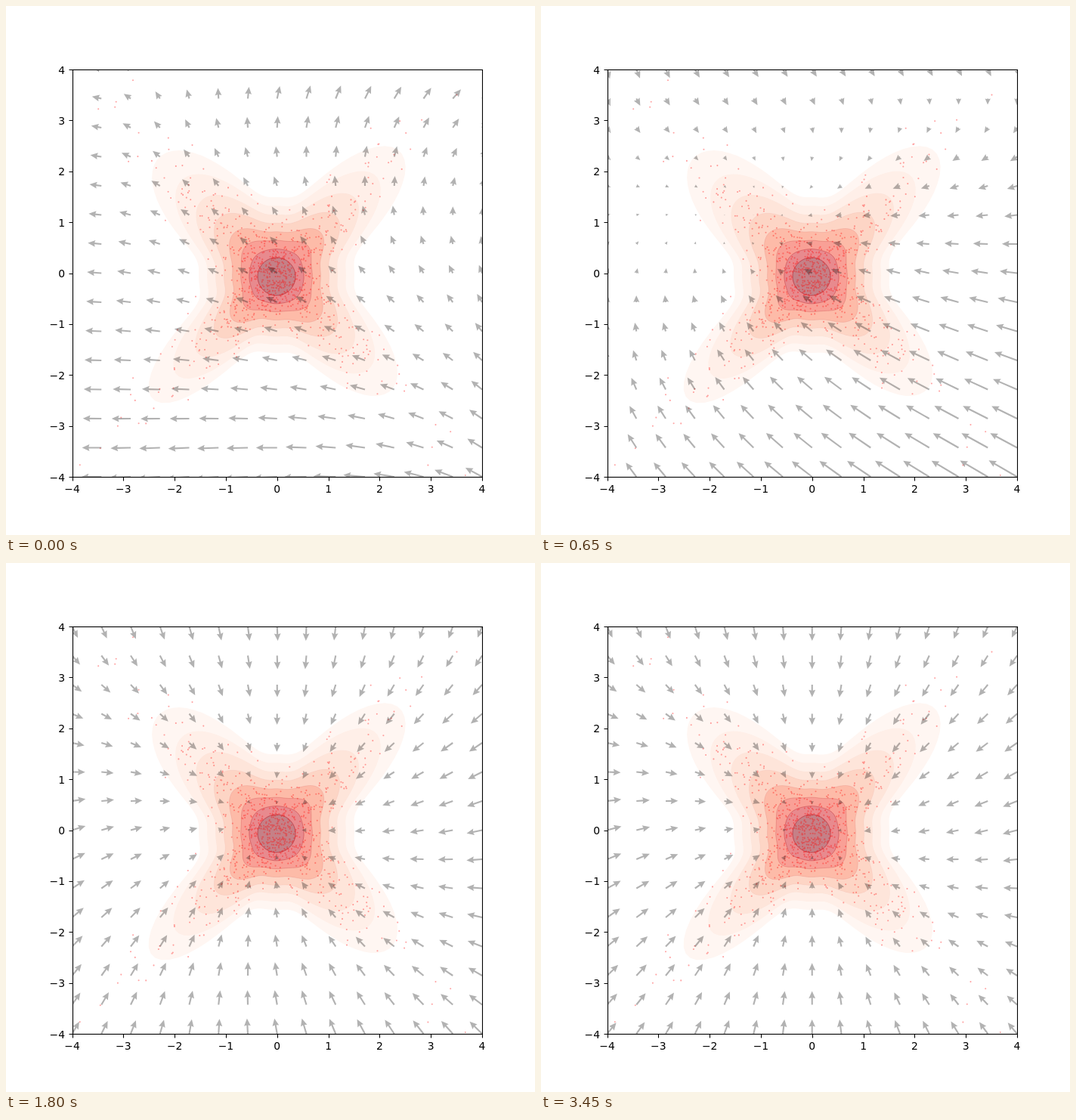
Write an HTML page that moves like this. It is 700 px wide and 700 px high and loops after 3.5 s.

```html
<!DOCTYPE html>
<html lang="en">
<head>
<meta charset="utf-8">
<title>Vector field</title>
<style>
  html, body { margin: 0; width: 100%; height: 100%; overflow: hidden; background: #fff; }
  svg { display: block; width: 100%; height: 100%; }
  text { font: 13.9px "DejaVu Sans", sans-serif; }
</style>
</head>
<body>
<svg viewBox="0 0 700 700">
  <defs><clipPath id="box"><rect x="88" y="84" width="542.5" height="539.5"/></clipPath></defs>
  <g clip-path="url(#box)">
    <g id="density" stroke="#b0101c" stroke-width="0.8"></g>
    <path id="dots" stroke="#f00" stroke-opacity="0.36" stroke-width="2.1" stroke-linecap="round"/>
    <path id="arrows" fill-opacity="0.3"/>
  </g>
  <g id="axes" stroke="#000" stroke-width="1.1" fill="none"></g>
  <g id="labels"></g>
</svg>
<script>
const LEFT = 87.5, TOP = 84, W = 542.5, H = 539, CELLS = 14;
const LOOP = 3500, STEP = 50;
const $ = id => document.getElementById(id);

function add(parent, tag, attrs, text) {
  const el = document.createElementNS(parent.namespaceURI, tag);
  for (const k in attrs) el.setAttribute(k, attrs[k]);
  if (text) el.textContent = text;
  parent.appendChild(el);
}

// Density levels: rings that stretch into four arms
const FILLS = ['#fff6f2', '#ffefe8', '#fee5da', '#fdd5c5', '#fdbba8', '#f9a096', '#e88a8e', '#c58087'];
const ARMS = [ // clockwise from lower right
  { reach: 112, power: 3.8 },
  { reach: 129, power: 6 },
  { reach: 117, power: 3.2 },
  { reach: 128, power: 4.3 }
];
FILLS.forEach((fill, i) => {
  const inner = i / 7, waist = 103 - 78 * inner, stretch = (1 - inner) ** 2;
  const pts = [];
  for (let deg = 0; deg < 360; deg += 2) {
    const a = deg * Math.PI / 180, arm = ARMS[Math.floor(deg / 90)];
    const r = waist + arm.reach * stretch * Math.abs(Math.sin(2 * a)) ** arm.power;
    pts.push(`${(358 + r * Math.cos(a)).toFixed(1)},${(356 + 2 * inner + r * Math.sin(a)).toFixed(1)}`);
  }
  add($('density'), 'polygon', { points: pts.join(' '), fill, 'stroke-opacity': 0.7 * inner ** 3 });
});

// Samples: a seeded cross-shaped cloud
let seed = 20;
const rnd = () => (seed = seed * 16807 % 2147483647) / 2147483647;
const gauss = () => Math.sqrt(-2 * Math.log(rnd())) * Math.cos(2 * Math.PI * rnd());
let dots = '';
for (let i = 0; i < 900; i++) {
  const g = gauss(), along = g * (50 + 28 * Math.abs(g)), side = gauss() * 20;
  const flip = rnd() < 0.5 ? 1 : -1;
  const x = 359 + (along + side) * 0.71, y = 356 + (along - side) * 0.71 * flip;
  dots += `M${x.toFixed(1)} ${y.toFixed(1)}h0`;
}
$('dots').setAttribute('d', dots);

// Axes
add($('axes'), 'rect', { x: 88.5, y: 84.5, width: 542, height: 539 });
for (let v = -4; v <= 4; v++) {
  const x = LEFT + (v + 4) * W / 8, y = TOP + (4 - v) * H / 8;
  const label = v < 0 ? '\u2212' + -v : '' + v;
  add($('axes'), 'path', { d: `M${Math.round(x) + 0.5} 623.5v5M88.5 ${Math.round(y) + 0.5}h-5` });
  add($('labels'), 'text', { x, y: 644, 'text-anchor': 'middle' }, label);
  add($('labels'), 'text', { x: 78, y: Math.round(y + 5.55), 'text-anchor': 'end' }, label);
}

// Field modes, in pixels with v upwards, for x and y from -1 to 1
const drift = (x, y) => [
  -12.2 + 8 * x + 18.4 * y + 6.5 * x * y - 7 * x * x * y,
  8.3 + 5.5 * x + 9.7 * y - 3 * x * x - 11 * x * x * y
];
const surge = (x, y) => [
  -7 - 2 * x + 11.5 * y + 3 * x * y,
  3.2 - 5.2 * y
];
function inward(x, y) {
  const pull = 23 / Math.sqrt(x * x + y * y + 0.47);
  return [
    -pull * x + 5 * x * y * y * (1 + 0.5 * y),
    -pull * y - 5 * x * (1 - y * y)
  ];
}

// The drift settles into the inward flow while a surge rises and fades
function fieldAt(t) {
  const settled = 1 - Math.exp(-((t / 575) ** 1.4));
  const s = t / 500, wave = (s * Math.exp(1 - s)) ** 1.3;
  return (x, y) => {
    const a = drift(x, y), b = inward(x, y), c = surge(x, y);
    return a.map((v, i) => v + (b[i] - v) * settled + c[i] * wave);
  };
}

const SHAFT = 1.08, HEAD = 9.8, NOTCH = 8.8, HALF = 4.4;
function arrow(x, y, dx, dy) {
  const len = Math.hypot(dx, dy);
  if (len < 0.3) return '';
  const k = Math.min(1, len / HEAD), c = dx / len, s = dy / len; // short arrows shrink whole
  const neck = len - NOTCH * k, barb = len - HEAD * k, w = SHAFT * k, h = HALF * k;
  const pts = [[0, w], [neck, w], [barb, h], [len, 0], [barb, -h], [neck, -w], [0, -w]];
  return 'M' + pts.map(([a, b]) =>
    `${(x + a * c - b * s).toFixed(2)} ${(y + a * s + b * c).toFixed(2)}`).join('L') + 'Z';
}

function draw(t) {
  const field = fieldAt(t);
  let d = '';
  for (let r = 0; r <= CELLS; r++) {
    for (let c = 0; c <= CELLS; c++) {
      const fx = c / CELLS, fy = r / CELLS;
      const [u, v] = field(2 * fx - 1, 1 - 2 * fy);
      d += arrow(LEFT + fx * W, TOP + fy * H, u, -v);
    }
  }
  $('arrows').setAttribute('d', d);
}

const start = performance.now();
let shown = -1;
function tick() {
  const t = Math.floor((performance.now() - start) % LOOP / STEP) * STEP;
  if (t !== shown) draw(shown = t);
  requestAnimationFrame(tick);
}
tick();
</script>
</body>
</html>
```
